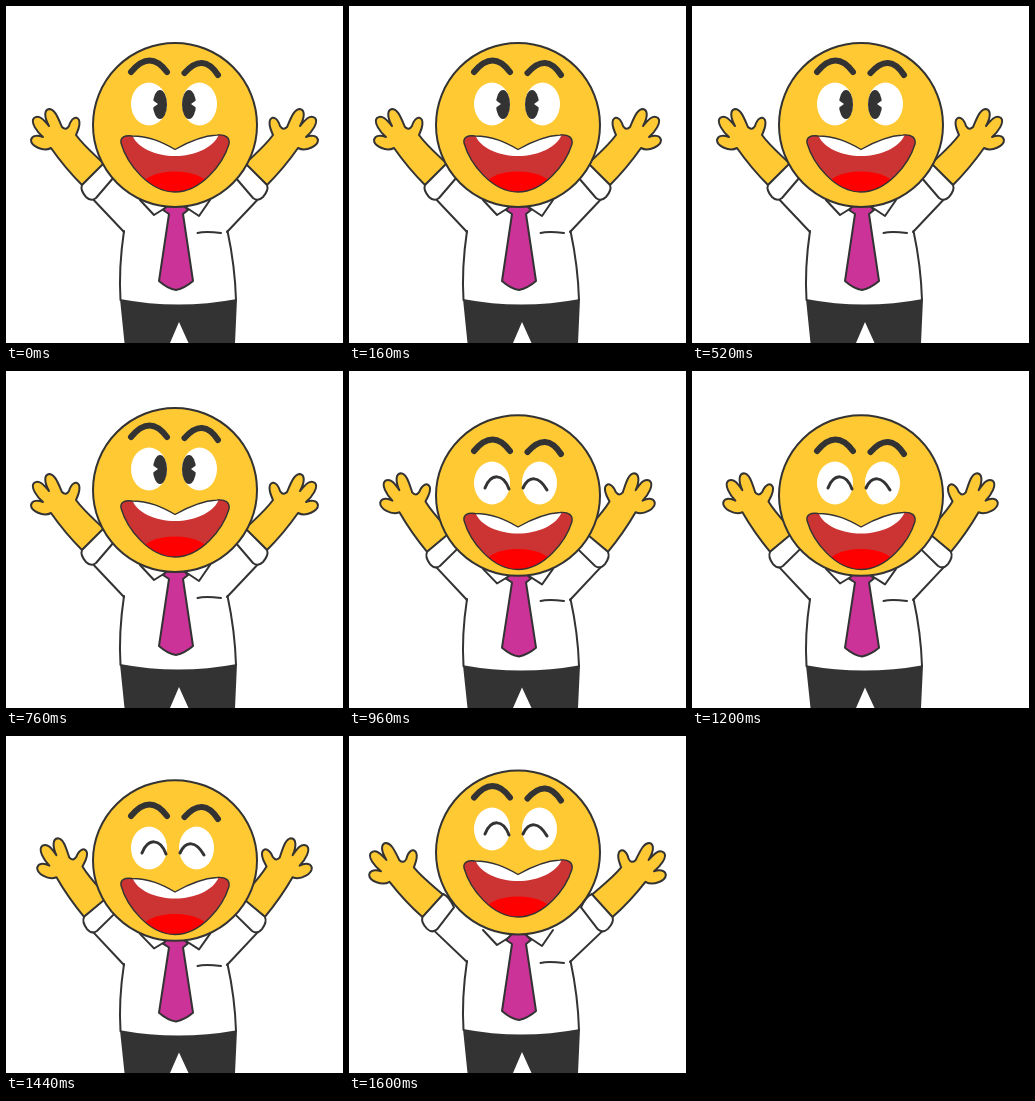
Recreate the animation shown at these times as an HTML page without scripts. Size 337 px wide and 337 px high, loop 2000 ms.

```html
<!DOCTYPE html>
<html lang="en">
<head>
<meta charset="utf-8">
<title>Cheering face</title>
<style>
  html, body { margin: 0; width: 100%; height: 100%; overflow: hidden; background: #fff; }
  svg {
    display: block; width: 100%; height: 100%;
    fill: none; stroke: #333; stroke-width: 2; stroke-linejoin: round; stroke-linecap: round;
    animation: cheer 2s step-end infinite;
  }
  .skin { fill: #ffc933; }
  .cloth { fill: #fff; }
  .dark { fill: #333; stroke: none; }
  .white { fill: #fff; stroke: none; }

  .body { transform: scaleY(var(--body)); transform-origin: 0 337px; }
  .sleeve { transform: rotate(var(--sleeve)); transform-origin: 118px 226px; }
  .arm { transform: var(--arm); transform-origin: 78px 180px; }
  .head { transform: var(--head); transform-origin: 169px 119px; vector-effect: non-scaling-stroke; }
  .brows { transform: translateY(var(--brow)); stroke-width: 6; }
  .eyes { transform: translateY(var(--eye)); }
  .left-eye { transform: translateX(var(--left)) scaleX(var(--wide)); transform-origin: 143px 98px; }
  .right-eye { transform: translateX(var(--right)) scaleX(var(--wide)); transform-origin: 193.5px 98px; }
  .glint { transform: scaleX(var(--glint)); transform-origin: 154px 98px; }
  .mouth { transform: translateY(var(--mouth)); stroke-width: 1.4; }
  .open { opacity: var(--open); }
  .shut { opacity: calc(1 - var(--open)); stroke-width: 3; }

  /* Each block is one pose, listed at the moments it is struck. */
  @keyframes cheer {
    0%, 8%, 26%, 38% {
      --open: 1; --glint: 1; --wide: 1; --left: 0px; --right: 0px;
      --eye: 0px; --brow: 0px; --mouth: 0px; --body: 1;
      --head: none; --sleeve: 0deg; --arm: none;
    }
    4%, 22%, 34% {
      --open: 1; --glint: 1; --wide: 1; --left: 0px; --right: 0px;
      --eye: 2px; --brow: 2px; --mouth: 2px; --body: 1;
      --head: translateY(1px); --sleeve: 0deg; --arm: translate(1px, 1px) rotate(2.5deg);
    }
    18%, 30% {
      --open: 1; --glint: -1; --wide: 1.1; --left: 2px; --right: -2px;
      --eye: -8px; --brow: -11px; --mouth: -6.5px; --body: 1.035;
      --head: translateY(-7.5px) scaleY(1.03); --sleeve: 5deg; --arm: translate(4.5px, -9.5px) rotate(7deg);
    }
    48%, 60%, 72% {
      --open: 0; --glint: 1; --wide: 1; --left: 0px; --right: -3px;
      --eye: 14px; --brow: 14px; --mouth: 12.5px; --body: .973;
      --head: translateY(5.5px) scaleY(.98); --sleeve: 1deg; --arm: translate(2px, 2px) rotate(5deg);
    }
    52%, 64%, 76% {
      --open: 0; --glint: 1; --wide: 1; --left: 0px; --right: -3px;
      --eye: 4.5px; --brow: 5px; --mouth: 4px; --body: .987;
      --head: translateY(2px); --sleeve: -1deg; --arm: translateY(2px) rotate(1deg);
    }
    56%, 68%, 80%, 100% {
      --open: 0; --glint: 1; --wide: 1; --left: 0px; --right: -3px;
      --eye: -5px; --brow: -4.5px; --mouth: -5px; --body: 1;
      --head: translateY(-2.5px); --sleeve: -3deg; --arm: translate(-2.5px, 2px) rotate(-3deg);
    }
  }
</style>
</head>
<body>
<svg viewBox="0 0 337 337">
  <defs>
    <path id="lips" d="M115 137C114 131 119 129 126 130C143 130 156 136 169 143.500C182 136 195 130 211 129C220 128 224 132 223 138C217 158 195 186 169 186C143 186 121 158 115 137Z"/>
    <clipPath id="inside"><use href="#lips"/></clipPath>
    <path id="sleeve" class="sleeve" d="M118 226L83 189"/>
    <g id="arm" class="arm">
      <path class="skin" d="M76 179C62 165 52 152 45 142C37 146 25 140 25 134C26 129 32 129 37 131C31 126 24 116 28 112C33 108 38 114 43 120C38 111 38 104 43 103C49 103 52 112 56 121Q60 125 63 120C65 113 70 109 73 114C75 119 72 124 70 129C78 140 89 149 98 158Z"/>
      <path class="cloth" d="M76 179L98 157Q104 160 108 171L90 192Q85 196 80 191Q74 184 76 179Z"/>
    </g>
  </defs>

  <g class="body">
    <use href="#sleeve"/>
    <use href="#sleeve" transform="matrix(-1 0 0 1 339 0)"/>
    <path d="M118 225Q112.500 262 114.500 294M221.500 225Q229 260 230 294"/>
    <path class="dark" d="M114 293Q172 304 231 293L229 337H182.500L173 316L164 337H118.500Z"/>
    <path d="M191.500 227Q199 225 215 227"/>
    <path class="cloth" d="M134 194L148 209L164 199L178 200L193 210L204 194"/>
    <path d="M163 208L153 275Q162 283 170 284Q179 282 187 275L177 208L182 204L176 198H163L157 204Z" fill="#cc3399"/>
  </g>

  <use href="#arm"/>
  <use href="#arm" transform="matrix(-1 0 0 1 337 0)"/>

  <circle class="skin head" cx="169" cy="119" r="82"/>

  <g class="brows">
    <path d="M125 66Q144 43 161 66M178.500 67Q197 46 212 69"/>
  </g>

  <g class="eyes">
    <ellipse class="white left-eye" cx="143" cy="98" rx="18" ry="21.500"/>
    <ellipse class="white right-eye" cx="193.500" cy="98" rx="17.500" ry="21.500"/>
    <g class="open">
      <ellipse class="dark" cx="154" cy="98.500" rx="7" ry="14.500"/>
      <ellipse class="dark" cx="183" cy="98.500" rx="7" ry="14.500"/>
      <path class="white glint" d="M145 93L152 98L145 103Z"/>
      <path class="white" d="M192 93L185 98L192 103Z"/>
    </g>
    <path class="shut" d="M136 103C142 88 154 88 160 104M174 103C180 90 190 91 198 105"/>
  </g>

  <g class="mouth">
    <use href="#lips" fill="#cc3333" stroke="none"/>
    <g clip-path="url(#inside)" stroke="none">
      <path class="white" d="M126 128C130 142 150 150 169 150C188 150 208 142 213 128Z"/>
      <ellipse cx="169" cy="182.500" rx="35" ry="17" fill="#f00"/>
    </g>
    <use href="#lips"/>
  </g>
</svg>
</body>
</html>
```
